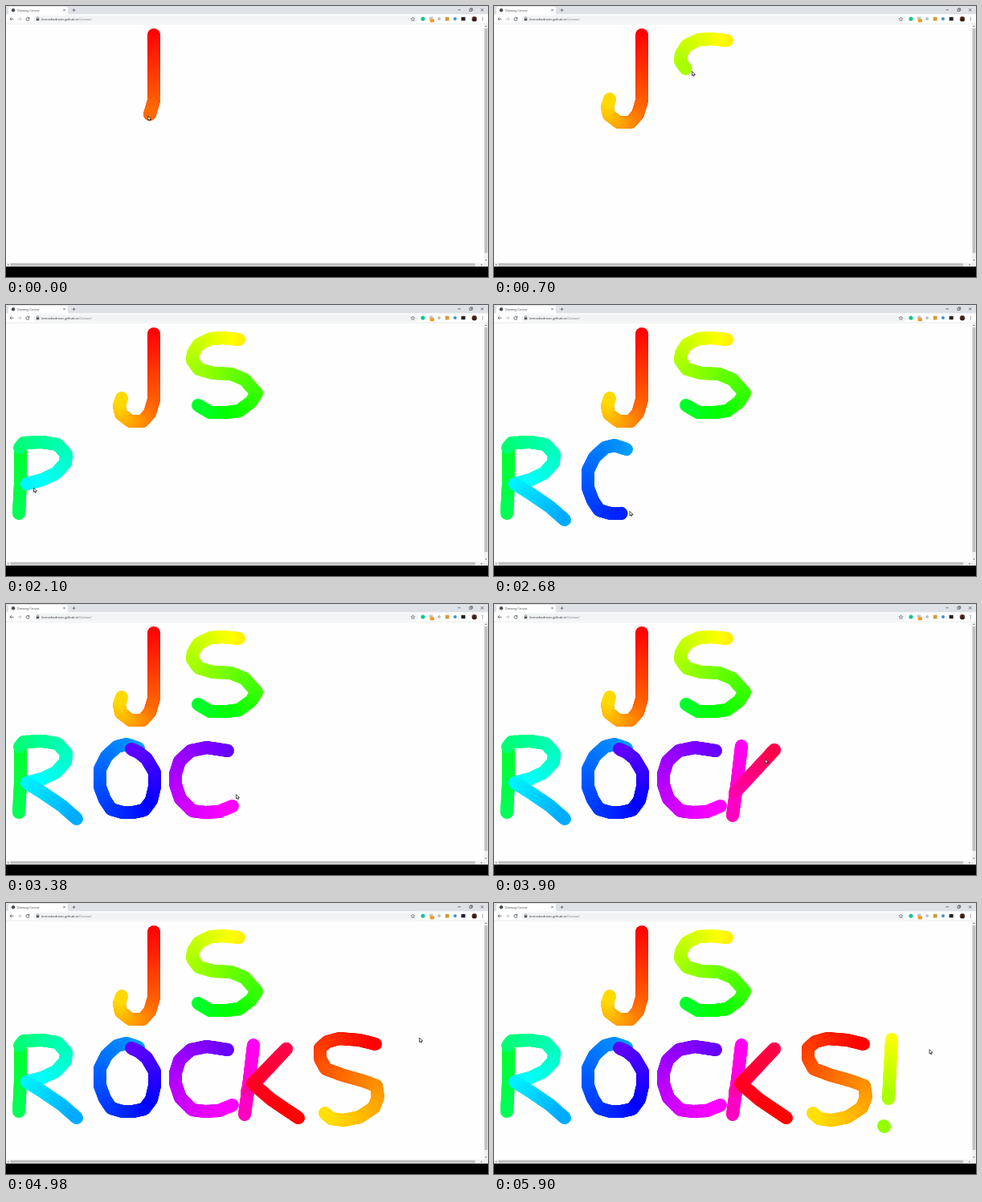
Write an HTML page with a canvas that moves like this. It is 600 px wide and 338 px high and loops after 5.92 s.

```html
<!DOCTYPE html>
<html lang="en">
<head>
<meta charset="utf-8">
<title>Drawing Canvas</title>
<style>
  html, body { margin: 0; width: 100%; height: 100%; overflow: hidden; background: #fff; }
  svg, canvas { position: absolute; left: 0; top: 0; width: 600px; height: 338px; }
  text { font-family: "Open Sans", sans-serif; }
</style>
</head>
<body>
<svg viewBox="0 0 600 338" fill="none" stroke-width=".8">
  <rect width="600" height="338" fill="#fefefe"/>
  <!-- tab strip -->
  <rect width="600" height="10.5" fill="#dee1e6"/>
  <path d="M1 10.5Q3 10.5 3 8V3Q3 1 5 1H75Q77 1 77 3V8Q77 10.5 79 10.5Z" fill="#fff"/>
  <circle cx="9" cy="5.2" r="2.2" fill="#4a4d51"/>
  <text x="14" y="6.6" font-size="3.7" fill="#45494d">Drawing Canvas</text>
  <path d="M71.3 4l2.4 2.4m0-2.4l-2.4 2.4M82.5 5.2h4m-2-2v4" stroke="#555" stroke-width=".7"/>
  <path d="M562.5 4.8h3.5M577 3.8h2.7v2.7H577zM578 3.8v-1h2.7v2.7h-1M591 3.2l3.4 3.4m0-3.4l-3.4 3.4" stroke="#333" stroke-width=".6"/>
  <!-- toolbar -->
  <rect y="10.5" width="600" height="11.5" fill="#fff"/>
  <rect x="34" y="11.8" width="479" height="9" rx="4.5" fill="#f1f3f4"/>
  <path d="M9.5 16.2H5m2-2l-2 2 2 2" stroke="#4f5357"/>
  <path d="M14.5 16.2H19m-2-2l2 2-2 2" stroke="#b4b6b9"/>
  <path d="M28.6 15a2 2 0 1 0 .4 1.6M29 13.8v1.8h-1.8" stroke="#4f5357"/>
  <path d="M38.4 15.8v-1a1.1 1.1 0 0 1 2.2 0v1" stroke="#4f5357" stroke-width=".6"/>
  <rect x="37.8" y="15.6" width="3.4" height="2.6" fill="#4f5357"/>
  <text x="44" y="17.7" font-size="4.1" fill="#303236">lorenzhadrivec.github.io<tspan fill="#777b80">/Canvas/</tspan></text>
  <path d="M506.5 13.9l.7 1.5 1.7.2-1.2 1.2.3 1.6-1.5-.8-1.5.8.3-1.6-1.2-1.2 1.7-.2z" stroke="#55585c" stroke-width=".6"/>
  <circle cx="519" cy="16" r="2.6" fill="#18c39a"/>
  <rect x="527" y="13.5" width="4.5" height="4" fill="#c5c7ca"/>
  <rect x="528" y="16.3" width="5" height="4" fill="#f39a1e"/>
  <circle cx="539.2" cy="16" r="2" fill="#bdbfc2"/>
  <rect x="546.8" y="13.7" width="4.8" height="4.8" fill="#d69a3a"/>
  <circle cx="559" cy="16" r="2" fill="#3f8fd0"/>
  <rect x="566.7" y="13.8" width="5" height="4.4" fill="#202124"/>
  <circle cx="583" cy="16.2" r="3.2" fill="#64352c"/>
  <path d="M580.8 18.5a2.2 2.2 0 0 1 4.4 0zM583 14a1.2 1.2 0 1 1-.1 0z" fill="#21191a"/>
  <path d="M593.3 14v.9m0 .9v.9m0 .9v.9" stroke="#4f5357" stroke-width=".9"/>
  <path d="M0 22.2h600" stroke="#dcdee0" stroke-width=".6"/>
  <!-- scroll bars -->
  <path d="M595 22.5h5V325H0v-4.8h595z" fill="#f1f1f1"/>
  <path d="M595.6 28h3.8v280h-3.8zM5.5 320.8H584v3.8H5.5z" fill="#c1c1c1"/>
  <path d="M596.3 26l1.2-1.4 1.2 1.4zM596.3 316.5l1.2 1.4 1.2-1.4zM3.2 321.5l-1.4 1.2 1.4 1.2zM591.5 321.5l1.4 1.2-1.4 1.2z" fill="#606060"/>
  <rect y="325" width="600" height="13" fill="#000"/>
</svg>
<canvas id="stage" width="600" height="338"></canvas>
<script>
const LOOP = 5920, LAG = 20, STEP = 1.5;
const ctx = document.getElementById('stage').getContext('2d');
const moves = [];

// A pen move along a path; without hues the pen is lifted.
function move(start, end, d, hue0, hue1) {
  const path = document.createElementNS('http://www.w3.org/2000/svg', 'path');
  path.setAttribute('d', d);
  const length = path.getTotalLength();
  const count = Math.max(1, Math.ceil(length / STEP));
  const points = Array.from({length: count + 1}, (_, i) => path.getPointAtLength(length * i / count));
  moves.push({start, end, points, hue0, hue1});
}

// J
move(-900, -20, 'M184 36V118L179 135', 0, 25);
move(-20, 370, 'M179 135L170 145H155L143 136 141 126 144 116', 25, 52);
// S
move(490, 1060, 'M290 43L270 41 255 42 240 49 233 60 232 69 240 80 258 85 280 86 297 93 312 110 305 121 290 132 275 134H254L239 125', 56, 130);
move(1215, 1215, 'M97 190H97.1');
move(1400, 1460, 'M27 186H27.1');
// R
move(1560, 1775, 'M18 182V222L16 260', 130, 140);
move(1840, 2080, 'M17 178L22 172 45 171 64 174 75 186 74 197 62 210 45 218 26 223', 146, 182);
move(2080, 2240, 'M26 223L45 235 70 252 88 268', 182, 200);
// O
move(2360, 2660, 'M165 180L150 175 138 178 125 190 117 206V228L123 244 131 256 145 260H158', 202, 232);
move(2660, 2860, 'M158 260L172 257 181 245 185 228V210L175 193 165 185 156 181', 232, 262);
// C
move(2960, 3330, 'M276 183L250 179 230 183 216 196 211 212V225L217 243 232 258 248 260 265 259 282 252', 263, 300);
move(3380, 3380, 'M286.5 238H286.6');
// K
move(3480, 3640, 'M308 177L303 220 297 264', 302, 315);
move(3720, 3870, 'M300 235L349 182', 318, 342);
move(3870, 4120, 'M349 182L307 225 330 245 364 268', 342, 361);
move(4320, 4320, 'M451.5 177.5H451.6');
// S
move(4350, 4840, 'M460 176L440 171 415 169 400 173 391 181V194L398 207 420 215 445 222 461 228 463 242 458 255 440 267 420 271 405 269 397 262', 358, 413);
move(4980, 4980, 'M514.5 168.5H514.6');
move(5080, 5120, 'M548 178H548.1');
// !
move(5260, 5470, 'M495 170L491 244', 60, 80);
move(5570, 5600, 'M485 278L486 279', 85, 87);
move(5860, LOOP, 'M542 183H542.1');

const clamp = x => Math.min(1, Math.max(0, x));
const progress = (m, t) => m.end > m.start ? clamp((t - m.start) / (m.end - m.start)) : +(t >= m.start);

function ink(m, t) {
  if (m.hue0 === undefined || t < m.start) return;
  const last = m.points.length - 1;
  const reach = Math.max(.01, progress(m, t) * last);
  for (let i = 0; i < reach; i++) {
    const a = m.points[i], b = m.points[i + 1], part = Math.min(1, reach - i);
    ctx.strokeStyle = `hsl(${m.hue0 + (m.hue1 - m.hue0) * i / last} 100% 50%)`;
    ctx.beginPath();
    ctx.moveTo(a.x, a.y);
    ctx.lineTo(a.x + (b.x - a.x) * part, a.y + (b.y - a.y) * part);
    ctx.stroke();
  }
}

function between(a, b, k) {
  return [a.x + (b.x - a.x) * k, a.y + (b.y - a.y) * k];
}

function pointerAt(t) {
  const i = moves.findLastIndex(m => m.start <= t);
  const m = moves[i], next = moves[i + 1], last = m.points.length - 1;
  if (t > m.end && next) {
    const k = (t - m.end) / (next.start - m.end);
    return between(m.points[last], next.points[0], k * k * (3 - 2 * k));
  }
  const p = progress(m, t) * last, n = Math.min(last - 1, Math.floor(p));
  return between(m.points[n], m.points[n + 1], p - n);
}

const arrow = new Path2D('M0 0V5L1.2 4 2 5.8 2.9 5.4 2.1 3.7H3.7Z');

function draw(now) {
  const t = now % LOOP;
  ctx.clearRect(0, 0, 600, 338);
  ctx.lineCap = 'round';
  ctx.lineWidth = 16;
  for (const m of moves) ink(m, t - LAG);
  ctx.save();
  ctx.translate(...pointerAt(t));
  ctx.lineWidth = .8;
  ctx.strokeStyle = '#222';
  ctx.fillStyle = '#fff';
  ctx.fill(arrow);
  ctx.stroke(arrow);
  ctx.restore();
}

const began = performance.now();
function tick() {
  draw(performance.now() - began);
  requestAnimationFrame(tick);
}
tick();
</script>
</body>
</html>
```
